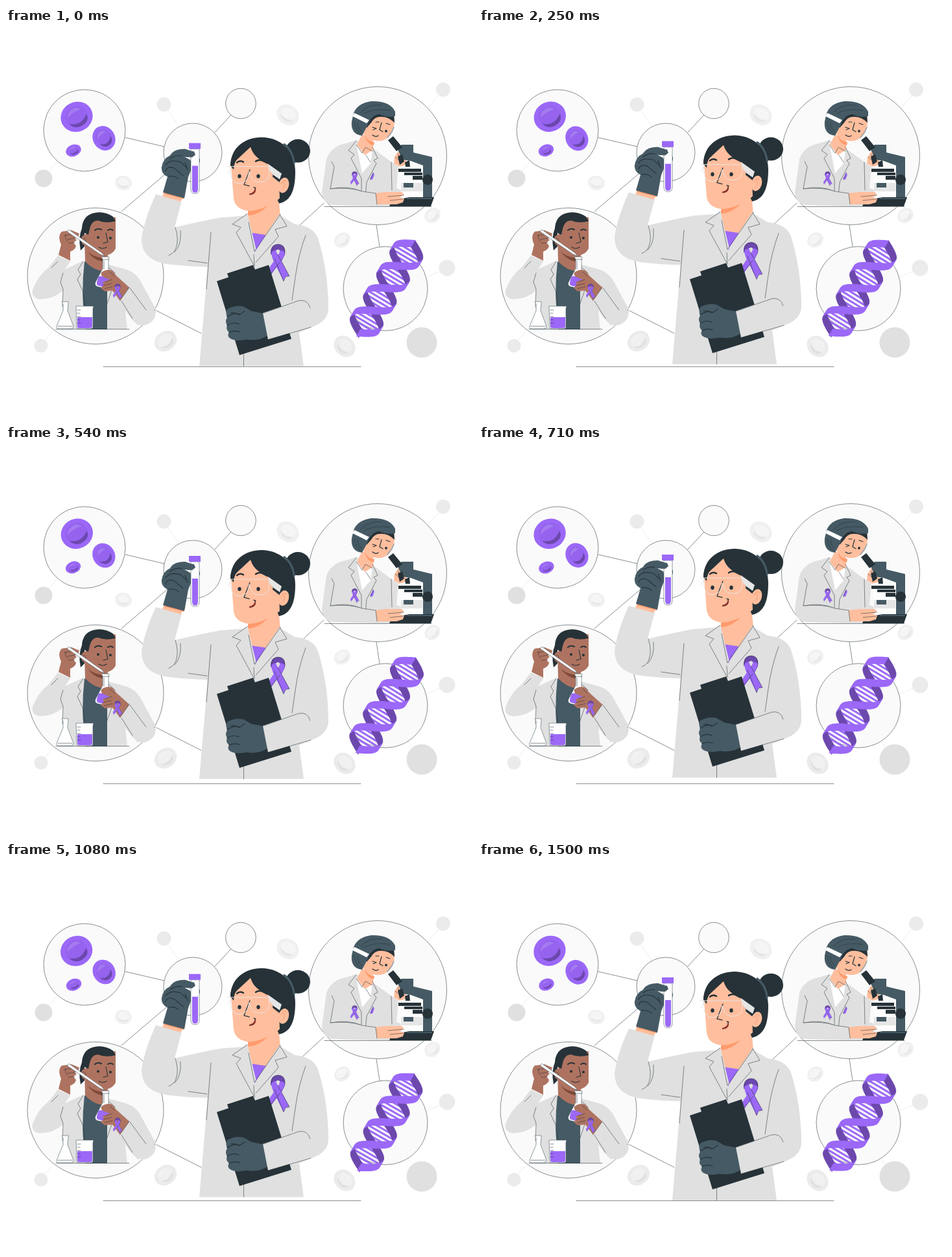
Animation, 720 px wide and 600 px high, one loop 1540 ms. Source, as an HTML page:

```html
<!DOCTYPE html>
<html lang="en">
<head>
<meta charset="utf-8">
<title>Laboratory research</title>
<style>
  html, body { margin: 0; width: 100%; height: 100%; overflow: hidden; background: #fff; }
  svg { display: block; width: 720px; height: 600px; }
  .line { fill: none; stroke: #263238; stroke-width: .55; stroke-linecap: round; stroke-linejoin: round; }
  .faint { stroke: #e0e0e0; }
  .disc { fill: #fafafa; stroke: #263238; stroke-width: .55; }
  .coat { fill: #e0e0e0; }
  .skin { fill: #ffbe9d; }
  .blush { fill: #ff9a6c; }
  .brown { fill: #ae7360; }
  .dark { fill: #263238; }
  .slate { fill: #455a64; }
  .purple { fill: #9b68f7; }
  .deep { fill: #6c48ad; }
  .white { fill: #fff; }
  .glass { fill: #fff; stroke: #455a64; stroke-width: .6; }
</style>
</head>
<body>
<svg viewBox="0 0 720 600">
  <defs>
    <g id="ribbon">
      <path class="deep" d="M408 350Q407 334 420 334Q432 335 430 350L424 362L421 355Q425 343 420 342Q415 342 415 348Z"/>
      <path class="purple" d="M430 346Q428 356 421 364L405 386L402 376L415 357Q421 350 423 343Z"/>
      <path class="purple" d="M409 346Q409 352 412 359L428 391L431 384L437 383L421 353Q417 347 416 343Z"/>
      <path class="line" d="M414 356L428 391L431 384L437 383L419 350M408 380L422 362M409 346Q410 334 420 334T430 347"/>
    </g>
  </defs>

  <g id="backdrop">
    <path class="line faint" d="M250 128L266 151M66 222L78 207M667 104L651 123M669 375L649 384M626 466L620 458M61 481L71 469"/>
    <g fill="#ebebeb">
      <circle cx="243.500" cy="118" r="11"/><circle cx="674" cy="95" r="11"/>
      <circle cx="680" cy="370" r="12.500"/><circle cx="54" cy="490" r="10.500"/>
    </g>
    <g class="coat"><circle cx="58" cy="232" r="13.500"/><circle cx="641" cy="485" r="23.500"/></g>
    <g id="paleCells"></g>
    <path class="line" d="M184 169L244 183M322 161L347 134M178 283L252 220M440 316L490 270M571 304L576 337M232 436L301 471M150 522.500H547"/>
    <circle class="disc" cx="121" cy="158" r="63"/>
    <circle class="disc" cx="288" cy="192" r="45"/>
    <circle class="disc" cx="362" cy="116.500" r="23.300"/>
    <circle class="disc" cx="573" cy="197" r="106.500"/>
    <circle class="disc" cx="585" cy="402" r="65"/>
    <circle class="disc" cx="138" cy="382.500" r="105"/>
  </g>
  <g id="cells"></g>
  <g id="dna"></g>

  <g id="chemist">
    <path class="coat" d="M80 351L99 360L91 372L117 360L155 364L184 372Q202 377 211 397L230 432Q234 451 216 458Q203 461 193 448L184 436L187 465H87L88 405Q70 420 50 418Q39 415 41 404Q49 382 66 369Z"/>
    <path class="slate" d="M121 360L156 372V465H122Q115 410 121 360Z"/>
    <path class="coat" d="M120 358L111 373L115 380L110 388L122 440V465H110V370ZM158 368L168 377L163 384L167 390L156 420Z"/>
    <path class="line" d="M119 360L111 373L115 380L110 388L119 407L122 435M158 369L168 378L163 384L168 390L156 425M88 378L84 392L88 403L87 430M185 398L216 437L230 435M80 360L70 370"/>
    <path class="brown" d="M121 320L122 360Q138 377 155 374L157 350L169 340V296L155 291L135 299Z"/>
    <path d="M126 344Q135 355 157 355L156 361Q135 360 126 344Z" fill="#7d4a3a"/>
    <path class="brown" d="M126 294L169 292V340Q164 351 148 351Q130 349 126 333Z"/>
    <path class="dark" d="M115 343Q111 323 117 309Q118 291 133 286Q150 281 165 291L169 298Q154 302 142 297Q132 297 129 310L127 319L121 316L121 337Z"/>
    <ellipse class="brown" cx="121.500" cy="327" rx="5.500" ry="8"/>
    <path class="line" d="M119 324Q125 324 122 332"/>
    <g class="dark"><circle cx="142" cy="323" r="2"/><circle cx="161" cy="324" r="2"/></g>
    <path class="line" style="stroke-width:2" d="M137 312Q141 308 147 311M157 312Q161 309 165 312"/>
    <path class="line" style="stroke-width:1.100" d="M154 316L157 330L150 332M143 338Q149 342 155 338"/>
    <path class="brown" d="M99 359L81 350L85 334Q79 321 86 314L101 312L113 317L111 323L106 324L109 327L104 331L108 336Q107 342 99 345Z"/>
    <path class="line" d="M90 320L106 318M95 326L107 324M96 332L106 331M92 319Q90 324 95 329"/>
    <path class="glass" d="M97 311L148 347L152 352L145 349L94 314Z"/>
    <path class="glass" d="M147 353H159L158 357V371L164 396Q163 402 156 402L141 399Q136 397 138 392L149 371V357Z"/>
    <path class="purple" d="M143 383H160L163 397Q161 400 153 400L141 397Q138 395 143 383Z"/>
    <path class="line" d="M147 357H159M151 359V372"/>
    <path class="brown" d="M190 400L176 421L164 405L152 406L146 401L151 396L149 392L160 388L152 385Q145 382 147 377Q155 371 164 374L170 382Z"/>
    <path class="line" d="M153 392L163 388M150 397L163 394M152 402L164 399M160 376L167 383M190 400L176 421"/>
    <use href="#ribbon" transform="translate(-2 256) scale(.415)"/>
    <path class="coat" d="M191 400L206 404L231 433L203 459L175 422Z"/>
    <path class="line" d="M191 401L216 435M178 421L195 448"/>
    <path class="glass" d="M86 422H96V425L95 436L104 460Q104 464 100 464H82Q77 464 78 460L88 436V426Z"/>
    <path class="glass" d="M108 429H135L134 433V461Q134 464 131 464H112Q109 464 109 461Z"/>
    <path class="purple" d="M110 446H133V460Q133 463 130 463H113Q110 463 110 460Z"/>
    <path class="line" d="M110 435H115M110 440H114M110 445H115M110 450H114M110 455H115M80 460H102M77 464.500H190"/>
  </g>

  <g id="microscopist">
    <path class="coat" d="M540 173L524 178Q501 182 494 202L487 253Q488 272 506 273L570 275H612L611 250L602 247L605 214L592 205L570 189Z"/>
    <path class="white" d="M540 178L555 182L565 188L562 209L549 224Z"/>
    <path class="skin" d="M549 164L541 180L553 196L566 188V170Z"/>
    <path class="blush" d="M553 165Q558 176 568 176L567 181Q556 179 553 165Z"/>
    <path class="skin" d="M556 144L566 134L599 138Q600 155 593 165Q584 176 570 174Q557 171 551 163Z"/>
    <path class="dark" d="M556 146L570 132L598 133L599 146Q589 136 577 137Q568 137 563 146L556 154Z"/>
    <path class="slate" d="M536 131Q542 116 563 113Q592 112 600 129V136Q589 139 575 133Q562 135 558 149L549 166Q531 164 533 144Z"/>
    <path class="line" d="M547 130Q560 116 580 119M552 132Q567 123 592 127M537 145Q538 158 548 164M542 145Q541 154 549 160"/>
    <path class="white" d="M537 131L560 142L556 147L534 136Z"/>
    <path class="line" style="stroke-width:1.200" d="M579 146L576 157L581 160M565 153L571 155L566 157M565 165Q570 169 574 166M586 147L592 149M570 145L575 145"/>
    <circle class="dark" cx="586" cy="159" r="1.900"/>
    <path class="line" style="stroke:#90a4ae;stroke-width:1.500" d="M588 169L595 160L598 153"/>
    <path class="line" d="M540 174L528 189L537 195L532 201L548 232V270M565 184L573 201L567 204L571 209L556 238L553 270M540 180L549 193L554 184L565 190M502 206L506 214L500 248Q528 243 546 251M594 207L595 250M508 270H555M555 196L562 207"/>
    <use href="#ribbon" transform="translate(374 91) scale(.39)"/>
    <path class="purple" d="M566 223L568 226L565 234L561 233Z"/>
    <path class="line" d="M566 223L562 234"/>
    <path class="skin" d="M607 214L598 209L599 199L605 190L612 190L618 199L616 211Z"/>
    <path class="white" d="M607 213H642V262H609Z" opacity=".65"/>
    <path class="slate" d="M603 185L610 180H628V192L657 199V263H643V212L624 205L611 203Z"/>
    <path class="dark" d="M589 173L597 167L611 184L602 190ZM604 198L611 195L614 206L607 211ZM615 207L622 204L623 214H616ZM605 217H640V222H605ZM614 223H642V227H614ZM627 228H642V234H627ZM595 266L622 261H660L655 275H591Z"/>
    <circle class="dark" cx="650" cy="234" r="8"/>
    <path fill="#e6e6e6" d="M609 239H642V252H609Z"/>
    <path class="slate" d="M613 239H628V246H613ZM618 262H657V264H618Z"/>
    <path class="skin" d="M568 255L586 253L610 253L614 257L606 261L614 263L612 269L602 272H572Z"/>
    <path class="line" d="M589 260L613 258M592 266L612 264M600 199L607 205M604 194L610 204M491 275.500H656"/>
    <path class="coat" d="M500 248Q530 245 549 252L570 255L572 274L508 273Z"/>
    <path class="line" d="M500 248Q530 245 549 252L570 255L572 272"/>
  </g>

  <g id="scientist">
    <path class="coat" d="M231 257L271 267L260 308Q298 299 330 293L369 290L381 317H402L420 288L445 303Q474 306 481 325Q496 372 497 428Q498 451 476 460L452 470L459 522H298L311 369Q271 368 245 364Q209 357 209 326Q213 296 231 257Z"/>
    <path class="skin" d="M373 270L374 310L379 317L386 340L423 291L420 258Z"/>
    <path class="purple" d="M376 316L403 320L384 346Z"/>
    <path class="coat" d="M372 286L364 292L349 303L362 308L355 316L382 366L386 343ZM422 287L433 306L415 311L420 323L384 365V345Z"/>
    <path class="line" d="M372 287L349 303L362 308L355 316L382 366M374 300L383 345L423 288M422 288L433 306L415 311L420 322L385 362M382 350L383 368M316 315L309 403M462 320Q451 349 446 385L441 420M269 313Q271 335 260 346M261 308Q267 326 262 340Q259 348 251 351M281 359L310 363M366.500 500V522"/>
    <ellipse class="dark" cx="450" cy="190" rx="19" ry="18"/>
    <path class="dark" d="M346 212C347 184 369 169 395 169C427 170 446 193 446 222C446 251 439 267 421 271L405 235Z"/>
    <path class="slate" d="M429 178Q443 187 446 209L443 211Q441 191 427 180Z"/>
    <path class="skin" d="M347 212L377 184Q383 204 405 207L411 226L421 237L422 263Q403 281 376 283Q354 281 351 264Z"/>
    <path class="blush" d="M373 283Q389 282 403 275Q390 289 373 290Z"/>
    <path class="dark" d="M346 213Q346 194 370 180L379 183Q368 188 360 198Q351 207 351 219ZM378 183Q384 203 405 211L412 224L411 230L421 238L428 227L436 205L412 180Z"/>
    <ellipse class="skin" cx="428" cy="243" rx="8" ry="12" transform="rotate(15 428 243)"/>
    <path class="line" style="stroke:#e88155" d="M424 241Q429 231 433 238M428 238Q432 244 426 249"/>
    <g class="dark"><ellipse cx="360" cy="229" rx="2.700" ry="3.200"/><ellipse cx="389" cy="229" rx="2.700" ry="3.200"/></g>
    <path class="line" style="stroke-width:2.500" d="M356 208Q360 204 366 207M385 206Q391 202 398 206"/>
    <path class="line" style="stroke-width:1.300" d="M376 219L367 242L375 244M376 257Q385 257 384 247M382 246L385 247"/>
    <path fill="#8a2e28" d="M375 256Q383 255 384 247Q388 256 375 258Z"/>
    <path d="M341 214H407M346 214L347 228Q349 240 360 240Q373 239 374 226L375 222L377 228Q380 239 393 238Q406 237 406 224L405 214M347 216L342 225" fill="none" stroke="#e8e4e2" stroke-width="1"/>
    <path fill="#e6e6e6" d="M404 210L425 225L422 234L412 227L407 221Z"/>

    <use href="#ribbon"/>
    <path class="dark" d="M325 391L343 385L341 379L381 366L384 373L405 366L440 480L360 505Z"/>
    <path class="slate" d="M341 434Q354 427 366 430L378 437L398 441L403 475Q390 484 371 481Q352 485 344 478Q341 474 344 470Q338 465 341 459Q337 453 341 447Q338 439 341 434Z"/>
    <path class="line" style="stroke-width:1.200" d="M341 446Q351 439 361 442L368 437M341 459Q350 453 359 457M344 470Q352 466 360 469M359 443Q355 439 347 440"/>
    <path class="coat" d="M396 440L451 421Q465 418 472 431L497 430Q498 451 475 460L404 481Z"/>
    <path class="line" d="M397 440L451 421Q465 418 469 432M404 481L470 462"/>

    <path class="skin" d="M246 249L277 257L269 268L241 260Z"/>
    <path class="blush" d="M245 252L275 261L274 264L243 256Z"/>
    <path class="slate" d="M242 254L249 230Q239 225 240 215Q242 202 253 197Q258 187 276 187L291 192L293 198L287 200L275 199L284 204L288 213L281 230L275 263Z"/>
    <path class="line" style="stroke-width:1.100" d="M253 202Q262 194 281 199M246 212Q252 202 269 207L279 216M246 221Q249 212 260 217L273 228M251 229Q260 228 266 233M276 208L280 219"/>
    <ellipse class="slate" cx="297" cy="205" rx="2" ry="4"/>
    <path class="glass" d="M285 187H298V249Q298 256 291.500 256T285 249Z"/>
    <path class="purple" d="M287 213H296V249Q296 254.500 291.500 254.500T287 249ZM282 178H300V187H282Z"/>
    <path class="slate" d="M274 188L290 191L292 196L287 200L271 198Z"/>
  </g>
</svg>
<script>
  const PERIOD = 1540;
  const byId = id => document.getElementById(id);

  function addCell(parent, x, y, rx, ry, tilt, [base, shade, light]) {
    parent.innerHTML += `<g transform="translate(${x} ${y}) rotate(${tilt}) scale(${rx} ${ry})">
      <circle r="1" fill="${base}"/>
      <circle cy="-.02" r=".7" fill="${light}"/>
      <path d="M-.6 .22Q0 .72 .62 .1Q.65 .65 0 .7Q-.45 .68 -.6 .22Z" fill="${shade}"/>
      <path d="M-.55 -.2Q-.35 -.65 .2 -.6L.45 -.35Q-.1 -.4 -.55 -.2Z" fill="#fff" opacity=".15"/></g>`;
  }

  const violet = ['#9b68f7', '#6c48ad', '#9563ee'];
  addCell(byId('cells'), 109, 137, 25, 23, -25, violet);
  addCell(byId('cells'), 151, 170, 17, 19.5, -30, violet);
  addCell(byId('cells'), 104, 189, 12, 9, -20, violet);

  const pale = ['#f0f0f0', '#e6e6e6', '#f5f5f5'];
  const grey = ['#ebebeb', '#e0e0e0', '#f0f0f0'];
  [[434.5, 134, 18, 15, 35, pale], [181, 239, 13, 11, 15, pale], [657.5, 289, 13, 11, -40, pale],
   [518.5, 327, 13, 11, -35, pale], [246, 483, 18, 15, -35, grey], [522, 491, 18, 15, 45, grey]]
    .forEach(cell => addCell(byId('paleCells'), ...cell));

  // Double helix: u runs along the axis, v across it
  function drawHelix() {
    const half = 40, radius = 25, band = 6;
    const point = (u, v) => `${(607 - .51 * u + .86 * v).toFixed(1)} ${(367 + .86 * u + .51 * v).toFixed(1)}`;
    const sweep = u => radius * Math.sin(Math.PI * u / half);
    const strand = (from, to, side, fill) => {
      const upper = [], lower = [];
      for (let u = from; u <= to; u += 1) {
        upper.push(point(u - band, side * sweep(u)));
        lower.unshift(point(u + band, side * sweep(u)));
      }
      return `<path d="M${upper.concat(lower).join('L')}Z" fill="${fill}" stroke="${fill}" stroke-linejoin="round"/>`;
    };
    let back = '', rungs = '', front = '';
    for (let k = -1; k <= 3; k++) {
      const from = Math.max(-half, (k - .5) * half), to = Math.min(3 * half + 1, (k + .5) * half);
      const side = k % 2 ? -1 : 1;
      back += strand(from, to, side, '#6c48ad');
      front += strand(from, to, -side, '#9b68f7');
    }
    for (let u = -half + 5; u < 3 * half; u += 6.2) {
      const v = Math.abs(sweep(u));
      rungs += `<path d="M${point(u, -v)}L${point(u, v)}" stroke="#9b68f7" stroke-width="3"/>`;
    }
    byId('dna').innerHTML = rungs + back + front;
  }
  drawHelix();

  function draw(now) {
    const turn = now % PERIOD / PERIOD;
    const lift = 9.3 * (1 - Math.abs(1 - 2 * ((turn + .02) % 1)));
    const sway = Math.sin(2 * Math.PI * turn);
    byId('scientist').setAttribute('transform', `translate(0 ${-lift})`);
    byId('dna').setAttribute('transform', `rotate(${sway} 585 402)`);
    byId('cells').setAttribute('transform', `rotate(${sway} 121 158)`);
    requestAnimationFrame(draw);
  }
  draw(performance.now());
</script>
</body>
</html>
```
